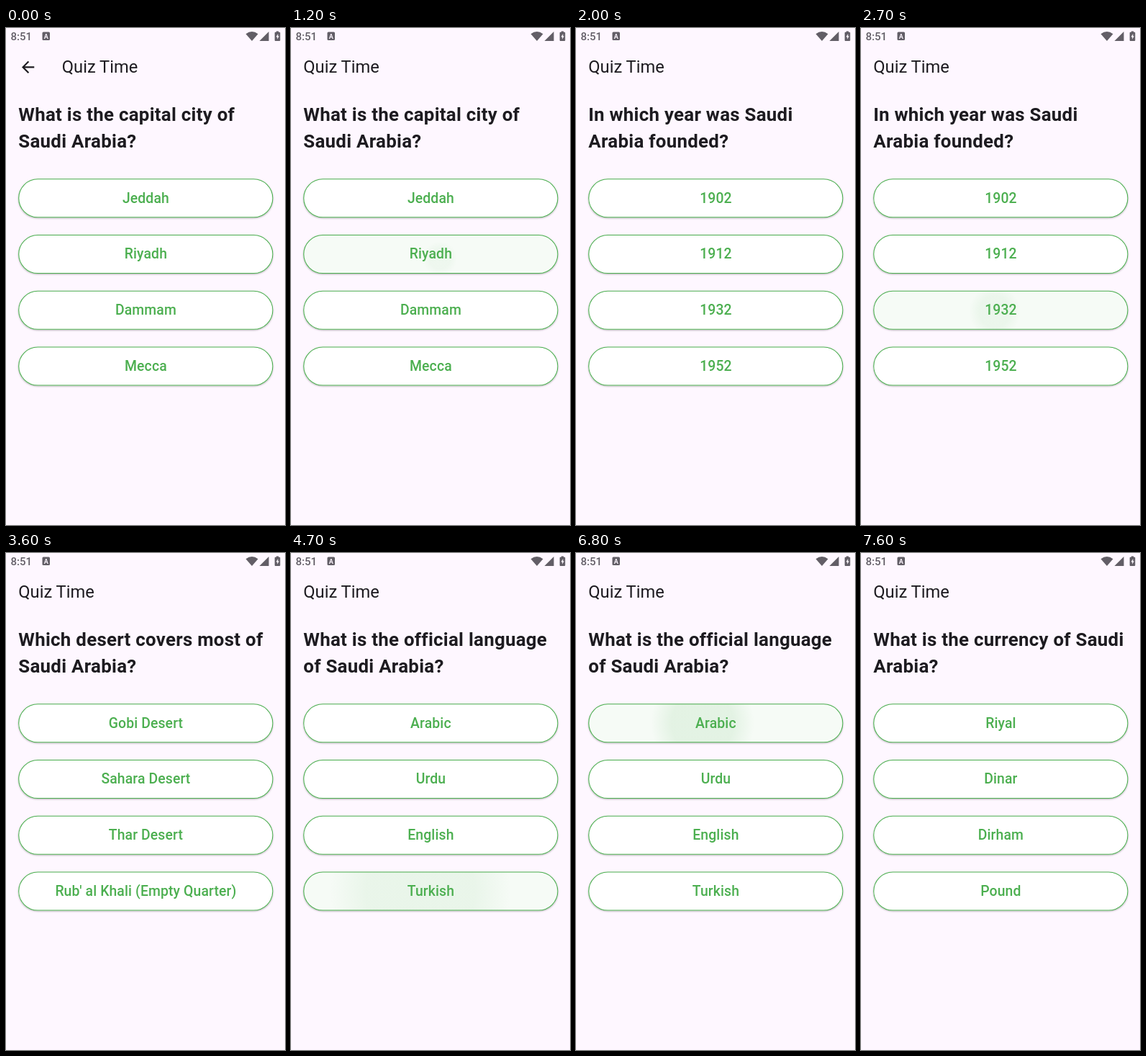
Write an HTML page that moves like this. It is 388x690 px and loops after 8000 ms.

```html
<!DOCTYPE html>
<html lang="en">
<head>
<meta charset="utf-8">
<title>Quiz Time</title>
<style>
  html, body { margin: 0; width: 100%; height: 100%; overflow: hidden; background: #fef7ff; }
  svg { display: block; width: 388px; height: 690px; font-family: Roboto, sans-serif; fill: #1d1b20; }
  .status { fill: #625e66; }
  .title { font-size: 23.7px; }
  .ask { font-size: 25.87px; font-weight: 700; letter-spacing: .27px; }
  .face { fill: #fff; filter: drop-shadow(0 1.4px 1px rgba(0, 0, 0, .3)); }
  .edge { fill: none; stroke: #4caf50; stroke-width: 1.08px; }
  .label { fill: #4caf50; font-size: 19.4px; font-weight: 500; letter-spacing: .108px; text-anchor: middle; }
</style>
</head>
<body>
<svg viewBox="0 0 388 690">
  <defs>
    <clipPath id="clip"><rect id="hole" x="17.3" width="354" height="54" rx="27"/></clipPath>
    <radialGradient id="soft">
      <stop offset=".6" stop-color="#4caf50"/>
      <stop offset="1" stop-color="#4caf50" stop-opacity="0"/>
    </radialGradient>
  </defs>
  <g class="status">
    <text x="6.5" y="17" font-size="15" font-weight="500">8:51</text>
    <rect x="50.5" y="5.5" width="10.5" height="11.5" rx="1.5"/>
    <text x="55.8" y="14.5" font-size="9" font-weight="700" text-anchor="middle" fill="#fef7ff">A</text>
    <path d="M333.5 8.2Q342 1.8 350.5 8.2L342 18Z"/>
    <path d="M365.5 5V18H352.5Z"/>
    <path d="M375.8 5.8V4.5h3.4v1.3h1.2q.9 0 .9.9V17q0 .9-.9.9h-5.8q-.9 0-.9-.9V6.700q0-.9.9-.9Z"/>
    <path d="M378.300 8l-2.800 4.600h1.700v3.200l2.600-4.600h-1.500Z" fill="#fef7ff"/>
  </g>
  <path id="back" transform="translate(17.7 41.5) scale(1.078)"
    d="M20 11H7.83l5.59-5.59L12 4l-8 8 8 8 1.41-1.41L7.83 13H20v-2z"/>
  <text id="title" class="title" y="62">Quiz Time</text>
  <text class="ask" x="17.3" y="129"></text>
  <text class="ask" x="17.3" y="166"></text>
  <g id="faces"></g>
  <g id="ripple" clip-path="url(#clip)">
    <rect id="tint" x="17" width="355" height="54" fill="#4caf50" opacity=".05"/>
    <circle id="splash" fill="url(#soft)"/>
  </g>
  <g id="edges"></g>
</svg>
<script>
const LOOP = 8000, STEP = 100, SWITCH = 85;

const quiz = [
  ["What is the capital city of", "Saudi Arabia?", "Jeddah", "Riyadh", "Dammam", "Mecca"],
  ["In which year was Saudi", "Arabia founded?", "1902", "1912", "1932", "1952"],
  ["Which desert covers most of", "Saudi Arabia?", "Gobi Desert", "Sahara Desert", "Thar Desert", "Rub' al Khali (Empty Quarter)"],
  ["What is the official language", "of Saudi Arabia?", "Arabic", "Urdu", "English", "Turkish"],
  ["What is the currency of Saudi", "Arabia?", "Riyal", "Dinar", "Dirham", "Pound"]
];

const taps = [
  { at: 1190, row: 1, x: 207, dy: 33 },
  { at: 2680, row: 2, x: 186, dy: 29 },
  { at: 4605, row: 3, x: 180, dy: 27 },
  { at: 6750, row: 0, x: 176, dy: 27 }
];

const $ = id => document.getElementById(id);
const set = (el, attrs) => { for (const k in attrs) el.setAttribute(k, attrs[k]); };
const clamp = v => Math.max(0, Math.min(1, v));
const rowTop = row => 209.3 + row * 77.75;

for (let row = 0; row < 4; row++) {
  const y = rowTop(row);
  const pill = (name, inset) => `<rect class="${name}" x="${17.2 + inset}" y="${y + inset}"
    width="${354.2 - 2 * inset}" height="${54 - 2 * inset}" rx="${27 - inset}"/>`;
  $("faces").innerHTML += pill("face", 0);
  $("edges").innerHTML += pill("edge", .5) +
    `<text class="label" x="194.4" y="${y + 33.4}"></text>`;
}
const lines = document.querySelectorAll(".ask, .label");

function drawRipple(tap, age) {
  const y = rowTop(tap.row);
  const strength = age < 50 ? .03 + age * .0016 : Math.max(.07, .11 - (age - 50) * .0008);
  set($("hole"), { y });
  set($("tint"), { y });
  set($("splash"), { cx: tap.x, cy: y + tap.dy, r: 12 + 1.2 * age, opacity: strength });
  set($("ripple"), { opacity: 1 - clamp((age - 150) / 400) });
}

function draw(t) {
  const started = t >= 100;
  set($("back"), { visibility: started ? "hidden" : "visible" });
  set($("title"), { x: started ? 17.3 : 77.8 });

  const page = quiz[taps.filter(tap => t >= tap.at + SWITCH).length];
  lines.forEach((el, i) => {
    if (el.textContent !== page[i]) el.textContent = page[i];
  });

  const tap = taps.find(p => t >= p.at && t < p.at + 550);
  set($("ripple"), { visibility: tap ? "visible" : "hidden" });
  if (tap) drawRipple(tap, t - tap.at);
}

// The screen updates ten times a second.
const start = performance.now();
function tick() {
  const t = (performance.now() - start) % LOOP;
  draw(Math.floor(t / STEP) * STEP);
  requestAnimationFrame(tick);
}
tick();
</script>
</body>
</html>
```
